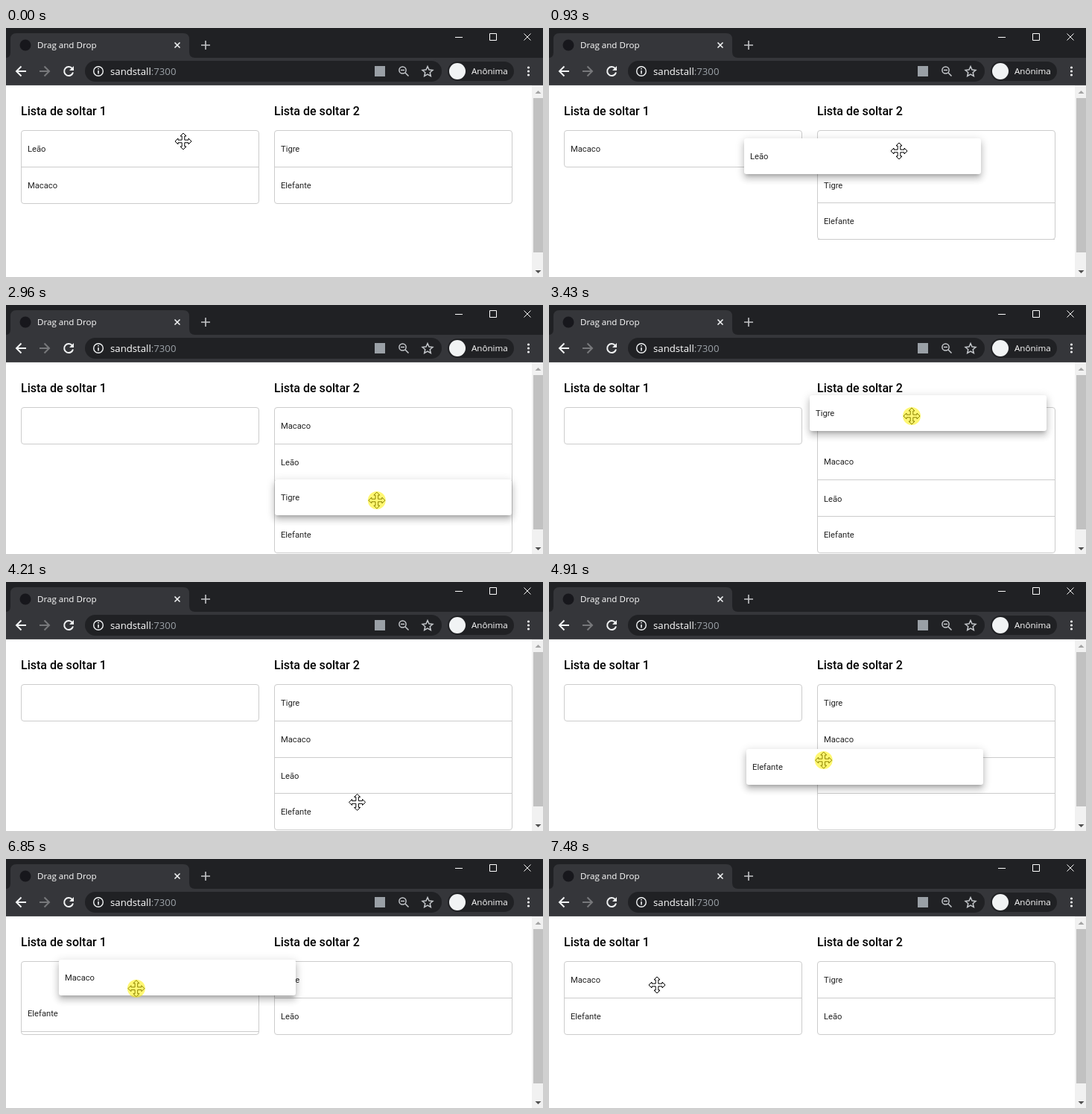
An HTML page that plays this animation: 721 px wide and 334 px high, repeating every 8.41 s.

```html
<!DOCTYPE html>
<html lang="pt-BR">
<head>
<meta charset="utf-8">
<title>Drag and Drop</title>
<style>
  html, body { margin: 0; width: 100%; height: 100%; overflow: hidden; background: #fff; }
  svg, .list, .item { position: absolute; box-sizing: border-box; }
  svg { left: 0; top: 0; }
  .ui { font-family: "Open Sans", "Noto Sans", sans-serif; font-size: 11.6px; fill: #fff; }
  .url { font-size: 13.2px; }
  .title { font: 500 16px Roboto, sans-serif; fill: #000; }
  .line { fill: none; stroke: #f1f3f4; }
  .list { top: 137px; width: 320px; border: 1px solid #ccc; border-radius: 4px; }
  .item {
    width: 318px; height: 48.75px; padding-left: 8px;
    border-bottom: 1px solid #ccc;
    font: 11.2px/49.75px Roboto, sans-serif; color: rgba(0, 0, 0, .87);
  }
  .item.last { border-color: transparent; }
  .item.card {
    z-index: 1; height: 48px; border: 0; border-radius: 3.2px; background: #fff;
    box-shadow: 0 4px 4px -2.4px rgba(0,0,0,.2), 0 6.4px 8px .8px rgba(0,0,0,.14), 0 2.4px 11.2px 1.6px rgba(0,0,0,.12);
  }
  #pointer { z-index: 2; }
</style>
</head>
<body>
<svg width="721" height="334">
  <path d="M0 0H721V77H0Z" fill="#202124"/>
  <path d="M0 40Q6 40 6 32V15Q6 7 14 7H238Q246 7 246 15V32Q246 40 254 40H721V77H0Z" fill="#35363a"/>
  <path d="M0 76.5H721" stroke="#4a4b4f"/>
  <rect x="106" y="44" width="479" height="28" rx="14" fill="#202124"/>
  <rect x="593" y="45" width="89" height="26" rx="13" fill="#202124"/>
  <circle cx="26" cy="23" r="7.5" fill="#17171c"/>
  <circle cx="606" cy="58" r="11" fill="#f1f3f4"/>
  <rect x="495" y="51" width="14" height="14" fill="#9aa0a6"/>

  <g class="line" stroke-width="1.6">
    <path d="M226.5 19.5l7 7m0-7l-7 7"/>
    <path d="M268 17v12m-6-6h12" stroke="#c4c5c7"/>
    <path d="M27 58H14m6.5-6.5L14 58l6.5 6.5" stroke-width="2"/>
    <path d="M45 58H58m-6.5-6.5L58 58l-6.5 6.5" stroke="#77787b" stroke-width="2"/>
    <path d="M89 54.5A6 6 0 1 0 90 59.5" stroke-width="2"/>
    <path d="M91 51v6h-6z" fill="#f1f3f4" stroke="none"/>
    <circle cx="124" cy="58" r="6.3" stroke-width="1.4"/>
    <path d="M124 57v4.5m0-7.5v1.6"/>
    <g stroke="#c4c7cb" stroke-width="1.5">
      <circle cx="532.5" cy="56.5" r="4.6"/>
      <path d="M536 60l4.5 4.5M530 56.5h5"/>
      <path d="M566 51.5l2 4.5 4.9.5-3.7 3.2 1.1 4.8-4.3-2.5-4.3 2.5 1.1-4.8-3.7-3.2 4.9-.5z"/>
    </g>
  </g>
  <path class="line" d="M603 12.5h10M649.5 7.5h9v9h-9zM695.5 7.5l9 9m0-9l-9 9" style="stroke:#fff"/>
  <path d="M701.5 53v0m0 5v0m0 5v0" stroke="#f1f3f4" stroke-width="3.2" stroke-linecap="round"/>

  <g class="ui">
    <text x="42" y="27">Drag and Drop</text>
    <text x="140" y="63" class="url">sandstall<tspan fill="#9aa0a6">:7300</tspan></text>
    <text x="625" y="62">Anônima</text>
  </g>

  <path d="M706 77H721V334H706Z" fill="#f1f1f1"/>
  <path d="M708 94H721V301H708Z" fill="#c1c1c1"/>
  <path d="M710.5 88l4-4 4 4z" fill="#a3a3a3"/>
  <path d="M710.5 325l4 4 4-4z" fill="#505050"/>

  <text class="title" x="20" y="117">Lista de soltar 1</text>
  <text class="title" x="360" y="117">Lista de soltar 2</text>
</svg>

<svg id="pointer" width="721" height="334">
  <g id="cursor">
    <g fill="#fff" stroke="#000" stroke-linejoin="round">
      <path id="move" d="M0-11L4-7H1.8V-1.8H7V-4L11 0 7 4V1.8H1.8V7H4L0 11-4 7H-1.8V1.8H-7V4L-11 0-7-4V-1.8H-1.8V-7H-4Z"/>
      <path id="arrow" d="M-.5 0V16.5L3.3 13 5.8 18.8 8.2 17.8 5.8 12.2H10.8Z"/>
    </g>
    <circle id="halo" r="12" fill="#fff000" fill-opacity=".55"/>
  </g>
</svg>

<script>
const TICK = 77.9, LOOP = 8410, LAST = 96, SETTLE = 3.2, LAG = 0.12;
const ROW = 48.75, LIST_X = [20, 360], TOP = 137, START = [238, 152];
const names = { L: 'Leão', M: 'Macaco', T: 'Tigre', E: 'Elefante' };

// Pointer strokes: start, end, x, y
const strokes = [
  [0, 3, 229, 155], [6.5, 11, 470, 165], [12, 18, 209, 176], [21.5, 25, 490, 176],
  [28, 34, 498, 264], [37.5, 44, 487, 149], [44, 46, 499, 166], [48, 55, 470, 303],
  [59.5, 67, 245, 161], [70, 76.5, 469, 226], [80.5, 89.8, 143, 168], [91, 96, 145, 169]
];

// Drags: item, press, release
const drags = [['L', 5, 12], ['M', 19, 27.5], ['T', 36, 47.5], ['E', 58, 70], ['M', 80, 90.6]];

// Order of both lists from a given time on
const orders = [
  [0, 'LM', 'TE'], [9, 'M', 'LTE'], [23.4, '', 'MLTE'], [39.8, '', 'MTLE'], [41.5, '', 'TMLE'],
  [63.6, 'E', 'TML'], [84.5, 'EM', 'TL'], [86.1, 'ME', 'TL']
].map(([at, ...lists]) => ({ at, lists }));

const $ = id => document.getElementById(id);
const mix = (a, b, p) => a + (b - a) * p;
const clamp = p => Math.min(1, Math.max(0, p));
const settle = ticks => 1 - (1 - clamp(ticks / SETTLE)) ** 2.8;
const smooth = p => p * p * (3 - 2 * p);

function add(className, text = '') {
  const el = document.createElement('div');
  el.className = className;
  el.textContent = text;
  return document.body.appendChild(el);
}
const listEls = LIST_X.map(x => {
  const el = add('list');
  el.style.left = x + 'px';
  return el;
});
const itemEls = {};
for (const key in names) itemEls[key] = add('item', names[key]);

const pointerAt = k => strokes.reduce(([x, y], [from, to, toX, toY]) => {
  const p = smooth(clamp((k - from) / (to - from)));
  return [mix(x, toX, p), mix(y, toY, p)];
}, START);

const orderIndex = k => orders.findLastIndex(o => o.at <= k);

function place(key, i) {
  const { lists } = orders[i], list = lists[0].includes(key) ? 0 : 1;
  return { list, row: lists[list].indexOf(key), count: lists[list].length };
}

// Rows slide when a list reorders or grows, and jump when it shrinks.
function slot(key, k) {
  const index = orderIndex(k), { list, row, count } = place(key, index);
  let shown = row;
  for (let i = index; i > 0; i--) {
    const before = place(key, i - 1), after = place(key, i);
    if (before.list === after.list && before.row === after.row) continue;
    if (before.list === after.list && after.count >= before.count)
      shown = mix(before.row, row, settle(k - orders[i].at));
    break;
  }
  return { x: LIST_X[list] + 1, y: TOP + 1 + ROW * shown, last: shown === count - 1 };
}

// A pressed item follows the pointer once it has moved, then glides into its slot.
function itemAt(key, k) {
  const rest = slot(key, k);
  const drag = drags.find(([id, press, release]) => id === key && k >= press && k < release + SETTLE);
  if (!drag) return rest;
  const [, press, release] = drag;
  const home = slot(key, press), grab = pointerAt(press);
  const now = pointerAt(Math.min(k, release) - LAG);
  const dx = now[0] - grab[0], dy = now[1] - grab[1];
  if (Math.hypot(dx, dy) < 1) return rest;
  const p = settle(k - release);
  return { x: mix(home.x + dx, rest.x, p), y: mix(home.y + dy, rest.y, p), card: true };
}

function draw(k) {
  const { lists } = orders[orderIndex(k)];
  listEls.forEach((el, i) => el.style.height = ROW * Math.max(1, lists[i].length) + 1 + 'px');
  for (const key in itemEls) {
    const { x, y, last, card } = itemAt(key, k), el = itemEls[key];
    el.style.left = x + 'px';
    el.style.top = y + 'px';
    el.classList.toggle('last', !!last);
    el.classList.toggle('card', !!card);
  }
  const [x, y] = pointerAt(k);
  const pressed = drags.some(([, press, release]) => k >= press && k < release);
  const over = lists.some((s, i) =>
    x > LIST_X[i] && x < LIST_X[i] + 320 && y > TOP && y < TOP + ROW * s.length);
  const show = (id, on) => $(id).setAttribute('visibility', on ? 'visible' : 'hidden');
  show('move', pressed || over);
  show('arrow', !pressed && !over);
  show('halo', pressed);
  $('cursor').setAttribute('transform', `translate(${x} ${y})`);
}

function frame() {
  const ms = performance.now() % LOOP;
  draw(Math.min(LAST, Math.floor((ms + 25) / TICK)));
  requestAnimationFrame(frame);
}
frame();
</script>
</body>
</html>
```
